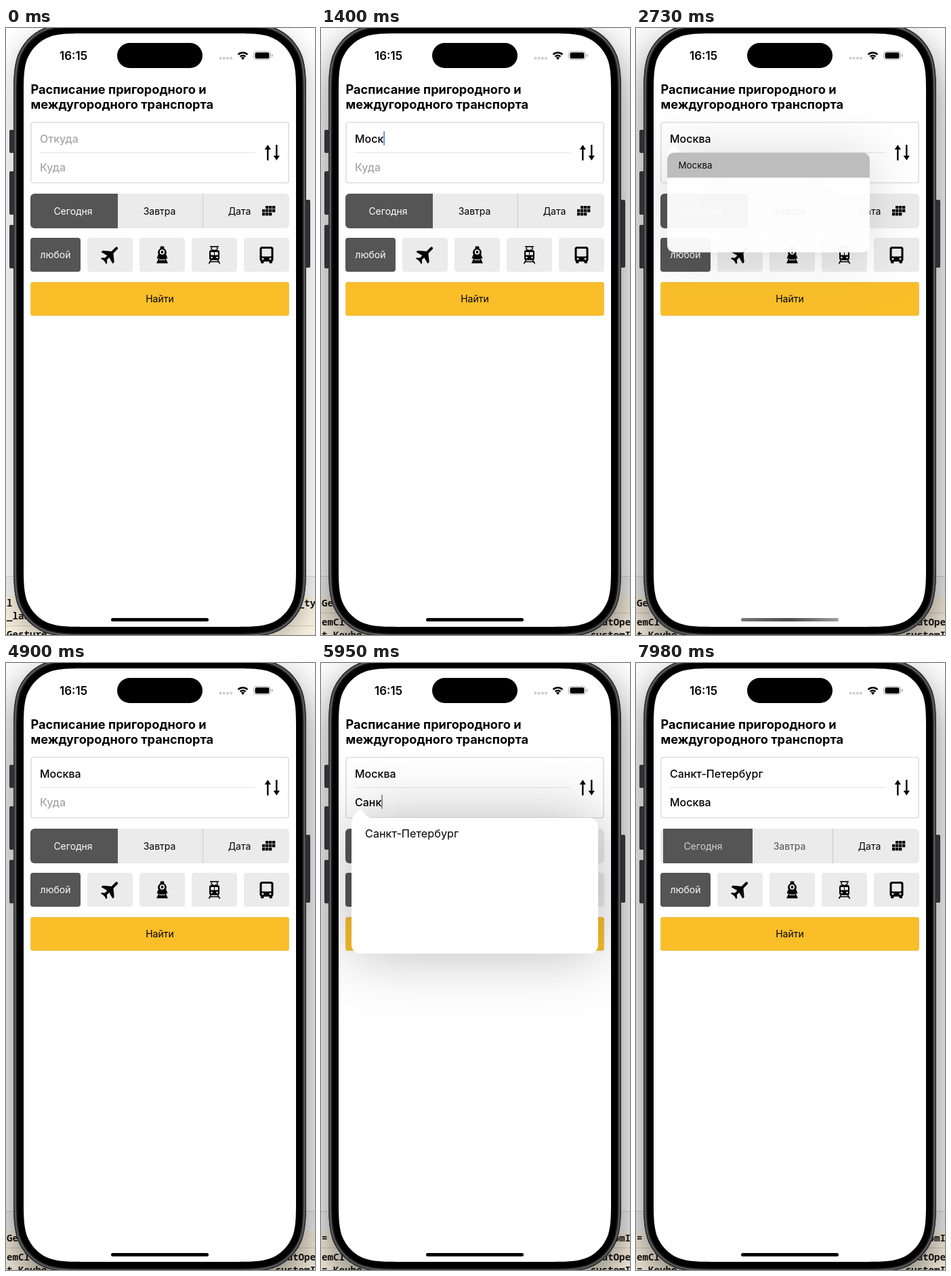
An HTML page with a canvas that plays this animation: 456 by 894 pixels, repeating every 8 s.

```html
<!DOCTYPE html>
<html lang="ru">
<head>
<meta charset="utf-8">
<style>
html, body { margin: 0; width: 100%; height: 100%; overflow: hidden; background: #fff; }
canvas { display: block; }
</style>
</head>
<body>
<canvas id="stage" width="456" height="894"></canvas>
<script>
const ctx = document.getElementById('stage').getContext('2d');
const LOOP = 8000, STEP = 70;
const SANS = 'Inter, "Noto Sans", sans-serif';
const MONO = '"Noto Sans Mono", "DejaVu Sans Mono", monospace';
const GRAY = '#ebebeb', DARK = '#555';
const clamp = v => Math.max(0, Math.min(1, v));
const between = (t, from, to) => t >= from && t < to;

function box(x, y, w, h, r, fill) {
  ctx.beginPath();
  ctx.roundRect(x, y, w, h, r);
  ctx.fillStyle = fill;
  ctx.fill();
}

function dot(x, y, r, fill) {
  ctx.beginPath();
  ctx.arc(x, y, r, 0, Math.PI * 2);
  ctx.fillStyle = fill;
  ctx.fill();
}

function poly(points, fill) {
  ctx.beginPath();
  points.forEach(([x, y]) => ctx.lineTo(x, y));
  ctx.closePath();
  ctx.fillStyle = fill;
  ctx.fill();
}

function line(points, width, color) {
  ctx.beginPath();
  points.forEach(([x, y], i) => i ? ctx.lineTo(x, y) : ctx.moveTo(x, y));
  ctx.lineWidth = width;
  ctx.strokeStyle = color;
  ctx.stroke();
}

function text(str, x, y, size, weight, color = '#000', align = 'left', family = SANS) {
  ctx.font = `${weight} ${size}px ${family}`;
  ctx.textAlign = align;
  ctx.fillStyle = color;
  ctx.fillText(str, x, y);
}

// Rectangle whose corners ease into the sides (continuous curvature).
function smoothRect(x, y, w, h, r) {
  const path = new Path2D();
  const corners = [[x, y, 1, 1], [x + w, y, -1, 1], [x + w, y + h, -1, -1], [x, y + h, 1, -1]];
  const half = [[1.529, 0], [1.088, 0], [.868, 0], [.631, .075], [.373, .169]];
  const curve = [...half, ...half.map(([a, b]) => [b, a]).reverse()];
  corners.forEach(([cx, cy, sx, sy], i) => {
    const p = curve.map(([a, b]) => [cx + sx * a * r, cy + sy * b * r]);
    if (i % 2 === 0) p.reverse();
    path.lineTo(...p[0]);
    path.bezierCurveTo(...p[1], ...p[2], ...p[3]);
    path.bezierCurveTo(...p[4], ...p[5], ...p[6]);
    path.bezierCurveTo(...p[7], ...p[8], ...p[9]);
  });
  path.closePath();
  return path;
}

const SCREEN = smoothRect(26, 8, 402, 874, 62);
const shell = inset => smoothRect(11 + inset, -7 + inset, 432 - 2 * inset, 904 - 2 * inset, 77 - inset);
const BODY = shell(0);
const RINGS = [[BODY, '#2c2c2e'], [shell(1.5), '#5a5a5c'], [shell(4), '#161617'], [shell(6), '#000'], [SCREEN, '#fff']];

// Each entry: left text, right text, baseline.
const CONSOLE = {
  launch: [['l C', '_ty', 852], ['_lau', '', 871], ['Gesture', '', 898]],
  first: [['Ge', '', 852], ['emCl', 'utOpe', 880], ['t Keybo', 'customI', 899]],
  second: [['=', 'omI', 852], ['emCl', 'utOpe', 880], ['= Keybo', 'customI', 899]]
};

function drawDesktop(t) {
  const focused = t >= 560;
  box(0, 0, 456, 894, 0, '#fff');
  box(0, 807, 456, 29, 0, '#f6f6f6');
  box(0, 807, 456, 1, 0, '#d4d4d4');
  box(0, 836, 456, 58, 0, '#fbf3e2');
  box(0, t < 980 ? 880 : 861, 456, 1, 0, '#d9cfbc');

  ctx.save();
  ctx.shadowColor = focused ? 'rgba(0,0,0,.5)' : 'rgba(0,0,0,.27)';
  ctx.shadowBlur = focused ? 60 : 38;
  ctx.shadowOffsetY = focused ? 24 : 14;
  ctx.fillStyle = '#333';
  ctx.fill(BODY);
  ctx.restore();

  const log = t < 980 ? CONSOLE.launch : t < 5180 ? CONSOLE.first : CONSOLE.second;
  for (const [left, right, y] of log) {
    text(left, 1, y, 14.2, 700, '#14120f', 'left', MONO);
    text(right, 457, y, 14.2, 700, '#14120f', 'right', MONO);
  }
}

function drawPhone() {
  for (const [x, y, h] of [[5, 150, 34], [5, 211, 64], [5, 290, 64], [442, 253, 100]]) {
    box(x, y, 7, h, 2, '#303032');
  }
  for (const [path, fill] of RINGS) {
    ctx.fillStyle = fill;
    ctx.fill(path);
  }
}

function drawStatusBar() {
  text('16:15', 79, 47, 17, 600);
  box(164, 22, 126, 37, 18.5, '#000');
  for (let i = 0; i < 4; i++) dot(316.5 + i * 5.2, 44.5, 1.9, '#c8c8c8');
  ctx.lineWidth = 2.5;
  ctx.strokeStyle = '#000';
  for (const r of [5.6, 9.8]) {
    ctx.beginPath();
    ctx.arc(349.5, 46, r, -Math.PI * .75, -Math.PI * .25);
    ctx.stroke();
  }
  poly([[349.5, 47], [346.8, 43.6], [349.5, 42.6], [352.2, 43.6]], '#000');
  ctx.beginPath();
  ctx.roundRect(365.5, 34.5, 25, 12, 4);
  ctx.lineWidth = 1;
  ctx.strokeStyle = '#a9a9a9';
  ctx.stroke();
  box(367.5, 36, 21, 9, 2.5, '#000');
  box(392, 38.5, 1.5, 4, 1, '#a9a9a9');
}

function plane(x, y) {
  ctx.save();
  ctx.translate(x, y);
  ctx.rotate(Math.PI / 4);
  ctx.scale(.92, .92);
  box(-2.2, -17, 4.4, 31, 2.2, '#000');
  poly([[-1.5, -6], [-13, 3.5], [-13, 7], [0, 3.5], [13, 7], [13, 3.5], [1.5, -6]], '#000');
  poly([[0, 7.5], [-6, 12.5], [-6, 15], [0, 13], [6, 15], [6, 12.5]], '#000');
  ctx.restore();
}

function steamTrain(x, y) {
  box(x - 2.8, y - 12.5, 5.6, 4, 1, '#000');
  dot(x, y - 3.5, 6.4, '#000');
  dot(x, y - 4, 3.7, GRAY);
  dot(x, y - 4, 1.9, '#000');
  poly([[x - 6, y], [x + 6, y], [x + 8, y + 5.5], [x - 8, y + 5.5]], '#000');
  poly([[x - 5, y + 5], [x + 5, y + 5], [x + 8.5, y + 12.5], [x - 8.5, y + 12.5]], '#000');
  line([[x - 4.5, y + 7.5], [x + 4.5, y + 7.5]], 1, GRAY);
}

function tram(x, y) {
  line([[x - 6.5, y - 12], [x + 6.5, y - 12]], 1.6, '#000');
  line([[x - 3, y - 12], [x - 5, y - 9], [x, y - 6], [x + 5, y - 9], [x + 3, y - 12]], 1.2, '#000');
  box(x - 7.5, y - 7, 15, 15, 3, '#000');
  box(x - 5.5, y - 4, 11, 4.5, 1, GRAY);
  line([[x, y - 4], [x, y + 1]], 1, '#000');
  dot(x - 4, y + 4, 1.3, GRAY);
  dot(x + 4, y + 4, 1.3, GRAY);
  line([[x - 5, y + 8], [x - 8, y + 13]], 1.7, '#000');
  line([[x + 5, y + 8], [x + 8, y + 13]], 1.7, '#000');
  line([[x - 6, y + 10.3], [x + 6, y + 10.3]], 1.5, '#000');
}

function bus(x, y) {
  box(x - 10, y - 12, 20, 22, 3.5, '#000');
  box(x - 7, y - 9, 14, 11.5, 1, GRAY);
  dot(x - 5.5, y + 6, 1.5, GRAY);
  dot(x + 5.5, y + 6, 1.5, GRAY);
  box(x - 8.5, y + 8, 4.5, 4.5, 1, '#000');
  box(x + 4, y + 8, 4.5, 4.5, 1, '#000');
}

function drawSegments(t) {
  const slide = clamp((t - 7840) / 140) ** 2;
  ctx.save();
  ctx.beginPath();
  ctx.roundRect(36, 244, 382, 51, 6);
  ctx.clip();
  box(36, 244, 382, 51, 0, GRAY);
  box(36 + 4 * slide, 244, 129 + 3 * slide, 51, 0, DARK);
  box(290, 244, 1, 51, 0, '#c9c9c9');
  ctx.restore();
  const light = 255 - 45 * slide, dim = 80 * slide;
  text('Сегодня', 99, 274.5, 14, 400, `rgb(${light},${light},${light})`, 'center');
  text('Завтра', 226.5, 274.5, 14, 400, `rgb(${dim},${dim},${dim})`, 'center');
  text('Дата', 344.5, 274.5, 14, 400, '#000', 'center');
  for (let row = 0; row < 3; row++) {
    for (let col = row ? 0 : 1; col < (row === 2 ? 3 : 4); col++) {
      box(378 + col * 5, 262 + row * 5, 4.3, 4.3, 0, '#000');
    }
  }
}

function drawForm(t, from, to, cursor) {
  text('Расписание пригородного и', 36.5, 96.5, 18.2, 700);
  text('междугородного транспорта', 36.5, 118.5, 18.2, 700);

  ctx.beginPath();
  ctx.roundRect(37, 139, 380, 89, 3);
  ctx.lineWidth = 1.6;
  ctx.strokeStyle = '#dedede';
  ctx.stroke();
  box(50, 183, 318, 1, 0, '#e4e4e4');

  [[from, 'Откуда', 168.5], [to, 'Куда', 210.5]].forEach(([value, hint, y], i) => {
    text(value || hint, 50, y, 16, 500, value ? '#000' : '#a6a6a6');
    if (cursor && cursor.field === i) {
      const x = 50 + (value ? ctx.measureText(value).width : 0);
      box(x, y - 16.5, value ? 1.5 : 2, 21, 1, cursor.color);
    }
  });

  ctx.save();
  ctx.globalAlpha = between(t, 7280, 7350) ? .3 : between(t, 7350, 7490) ? .6 : 1;
  for (const [x, tip, tail] of [[386.3, 172, 195], [399.3, 195, 172]]) {
    const dir = Math.sign(tail - tip);
    line([[x, tip + 3 * dir], [x, tail]], 2.4, '#000');
    poly([[x, tip], [x - 4.6, tip + 7 * dir], [x + 4.6, tip + 7 * dir]], '#000');
  }
  ctx.restore();

  drawSegments(t);

  box(36, 309, 74, 50, 4, DARK);
  text('любой', 73, 339, 14, 400, '#fff', 'center');
  [plane, steamTrain, tram, bus].forEach((icon, i) => {
    box(120 + i * 77, 309, 67, 50, 4, GRAY);
    icon(153.5 + i * 77, 334);
  });

  box(36, 374, 382, 50, 4, '#f9be28');
  ctx.beginPath();
  ctx.roundRect(36.5, 374.5, 381, 49, 3.5);
  ctx.lineWidth = 1;
  ctx.strokeStyle = '#eac66a';
  ctx.stroke();
  text('Найти', 227, 403.5, 14, 400, '#000', 'center');
}

function drawHomeBar(t) {
  let fill = '#000';
  if (between(t, 2730, 3360) || between(t, 6720, 7420)) {
    fill = ctx.createLinearGradient(155, 0, 299, 0);
    fill.addColorStop(0, '#777');
    fill.addColorStop(.5, '#4c4c4c');
    fill.addColorStop(1, '#a0a0a0');
  }
  box(155, 869, 144, 5, 2.5, fill);
}

// A suggestion list that grows out of its field and shrinks back into it.
function drawPopover(t, { top, label, open, pick, close }) {
  const shown = clamp((t - open) / 350);
  const gone = clamp((t - close) / 190);
  if (!shown || gone === 1) return;
  const grown = 1 - (1 - shown) ** 3;
  const scale = gone ? 1 - .68 * gone : .3 + .7 * grown;
  const height = 200 * (1 - .4 * gone);
  const anchorY = top - 14;

  ctx.save();
  ctx.clip(SCREEN);
  ctx.globalAlpha = gone ? 1 - .7 * gone * gone : grown;
  ctx.translate(51, anchorY);
  ctx.scale(scale, scale);
  ctx.translate(-51, -anchorY);

  const shape = new Path2D();
  shape.roundRect(45, top, 364, height, 13);
  const arrow = new Path2D();
  arrow.moveTo(45, top + 13);
  arrow.quadraticCurveTo(45, top + 1, 48, top - 3);
  arrow.lineTo(54.5, top - 11);
  arrow.quadraticCurveTo(57.5, top - 14.5, 60.5, top - 11);
  arrow.lineTo(67, top - 3);
  arrow.quadraticCurveTo(70, top, 76, top);
  arrow.lineTo(76, top + 13);
  arrow.closePath();
  ctx.fillStyle = '#fff';
  ctx.save();
  ctx.shadowColor = `rgba(0,0,0,${.27 * (1 - gone) ** 2})`;
  ctx.shadowBlur = 88 * scale;
  ctx.fill(shape);
  ctx.restore();
  ctx.fill(arrow);
  if (t >= pick) box(45, top, 364, 45, [13, 13, 0, 0], '#bababa');
  text(label, 65, top + 28.5, 16.3, 400);
  ctx.restore();
}

const LISTS = [
  { top: 186, label: 'Москва', open: 1470, pick: 2380, close: 2680 },
  { top: 228, label: 'Санкт-Петербург', open: 5600, pick: 6300, close: 6670 }
];

function typed(word, t, start, limit) {
  return word.slice(0, Math.max(0, Math.min(limit, Math.floor((t - start) / STEP) + 1)));
}

function cursorAt(t) {
  if (between(t, 770, 2450)) return { field: 0, color: t < 1540 ? '#3f78c4' : '#777' };
  if (between(t, 4970, 6370)) return { field: 1, color: t < 5670 ? '#3f78c4' : '#777' };
  return null;
}

function draw(t) {
  let from = typed('Москва', t, 1190, 6);
  let to = t < 6650 ? typed('Санк', t, 5390, 4) : 'Санкт-Петербург';
  if (t >= 7350) [from, to] = [to, from];

  drawDesktop(t);
  drawPhone();
  drawStatusBar();
  drawForm(t, from, to, cursorAt(t));
  drawHomeBar(t);
  LISTS.forEach(list => drawPopover(t, list));
}

function tick() {
  const t = performance.now() % LOOP;
  draw(Math.floor(t / STEP) * STEP);
  requestAnimationFrame(tick);
}
tick();
</script>
</body>
</html>
```
